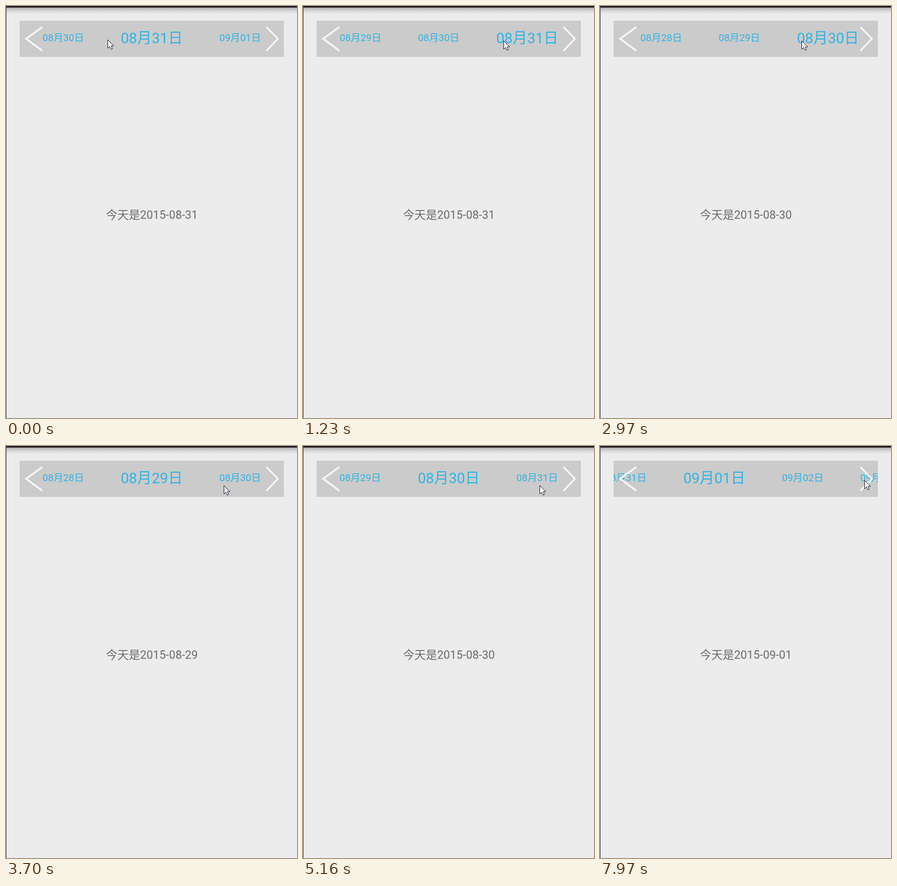
Write an HTML page with a canvas that moves like this. It is 556 by 786 pixels and loops after 8000 ms.

```html
<!DOCTYPE html>
<html lang="zh-CN">
<head>
<meta charset="utf-8">
<title>日期滑动选择</title>
<style>
html, body { margin: 0; width: 100%; height: 100%; overflow: hidden; background: #ececec; }
canvas { display: block; }
</style>
</head>
<body>
<canvas id="stage" width="556" height="786"></canvas>
<script>
const ctx = document.getElementById('stage').getContext('2d');
const LOOP = 8000;
const FAMILY = 'Roboto, "Noto Sans CJK SC", "Noto Sans CJK", sans-serif';
const BAR = { x: 26, y: 28, w: 505, h: 69 };
const CENTER = 278.4, GAP = 70.1;
const BIG = 27.9, SMALL = 18.7;
const SLOP = 35;

// Each phase eases the pointer to x, y in discrete steps; the strip follows a drag
// or sits at a fixed shift.
const start = { day: 31, x: 194, y: 64, shift: 0 };
const phases = [
  { from: 150,  to: 1110, steps: 8, day: 31, x: 379, y: 66, drag: true },
  { from: 1230, to: 1230, steps: 1, day: 31, x: 383, y: 66, shift: 150 },
  { from: 1510, to: 2080, steps: 5, day: 30, x: 193, y: 66, shift: 0 },
  { from: 2350, to: 2970, steps: 5, day: 30, x: 385, y: 66, drag: true },
  { from: 3250, to: 3700, steps: 4, day: 29, x: 416, y: 75, shift: 0 },
  { from: 4010, to: 4610, steps: 5, day: 29, x: 231, y: 75, drag: true },
  { from: 4890, to: 5160, steps: 3, day: 30, x: 452, y: 75, shift: 0 },
  { from: 5320, to: 5700, steps: 4, day: 30, x: 505, y: 65, shift: 0 },
  { from: 6120, to: 6120, steps: 1, day: 30, x: 505, y: 65, shift: -41 },
  { from: 6240, to: 6240, steps: 1, day: 31, x: 505, y: 65, shift: 0 },
  { from: 7080, to: 7080, steps: 1, day: 31, x: 505, y: 65, shift: -51 },
  { from: 7230, to: 7230, steps: 1, day: 32, x: 505, y: 65, shift: 0 },
  { from: 7970, to: 7970, steps: 1, day: 32, x: 505, y: 65, shift: -60 }
];

const easeOut = k => 1 - Math.pow(1 - k, 2.06);
const mix = (a, b, k) => a + (b - a) * k;
const pad = n => String(n).padStart(2, '0');

function stateAt(t) {
  const i = phases.findLastIndex(p => t >= p.from);
  if (i < 0) return start;
  const p = phases[i], prev = i ? phases[i - 1] : start;
  const gap = (p.to - p.from) / (p.steps - 1 || 1);
  const done = gap ? Math.floor((t - p.from) / gap + 0.001) + 1 : 1;
  const k = easeOut(Math.min(done, p.steps) / p.steps);
  const x = Math.round(mix(prev.x, p.x, k));
  const y = Math.round(mix(prev.y, p.y, k));
  const moved = x - prev.x;
  const shift = p.drag ? Math.sign(moved) * Math.max(0, Math.abs(moved) - SLOP) : p.shift;
  return { day: p.day, x, y, shift };
}

function dateParts(day) {
  const d = new Date(2015, 7, day);
  return [pad(d.getMonth() + 1), pad(d.getDate())];
}

function label(day) {
  const [m, d] = dateParts(day);
  return m + '月' + d + '日';
}

function setFont(size) {
  ctx.font = size + 'px ' + FAMILY;
}

function line(points, width, color) {
  ctx.beginPath();
  points.forEach(([x, y]) => ctx.lineTo(x, y));
  ctx.lineWidth = width;
  ctx.strokeStyle = color;
  ctx.stroke();
}

function drawBackground() {
  ctx.fillStyle = '#ececec';
  ctx.fillRect(0, 0, 556, 786);
  const shade = ctx.createLinearGradient(0, 3, 0, 15);
  shade.addColorStop(0, '#aeabae');
  shade.addColorStop(0.45, '#d4d2d4');
  shade.addColorStop(1, '#ececec');
  ctx.fillStyle = shade;
  ctx.fillRect(0, 3, 556, 12);
  ctx.fillStyle = '#241f25';
  ctx.fillRect(0, 0, 556, 3);
  ctx.fillStyle = '#444244';
  ctx.fillRect(0, 0, 1, 786);
}

function drawStrip(day, shift) {
  ctx.save();
  ctx.beginPath();
  ctx.rect(BAR.x, BAR.y, BAR.w, BAR.h);
  ctx.clip();
  ctx.fillStyle = '#cacbca';
  ctx.fillRect(BAR.x, BAR.y, BAR.w, BAR.h);

  ctx.fillStyle = '#30b3e4';
  ctx.textAlign = 'left';
  setFont(BIG);
  const bigWidth = ctx.measureText(label(day)).width;
  const left = CENTER + shift - bigWidth / 2;
  ctx.fillText(label(day), left, 70.5);

  setFont(SMALL);
  const pitch = ctx.measureText(label(day)).width + GAP;
  for (let n = 1; n <= 3; n++) {
    ctx.fillText(label(day - n), left - n * pitch, 67.4);
    ctx.fillText(label(day + n), left + bigWidth + GAP + (n - 1) * pitch, 67.4);
  }
  ctx.restore();
}

function drawArrows() {
  ctx.lineJoin = 'miter';
  const left = [[69.5, 40], [38.5, 62.5], [69.5, 85.5]];
  const right = [[497.5, 40], [519.5, 62.5], [497.5, 85.5]];
  for (const [points, width] of [[left, 3.6], [right, 3.2]]) {
    line(points, width + 1, 'rgba(255,255,255,0.2)');
    line(points, width - 0.4, 'rgba(255,255,255,0.8)');
  }
}

function drawMessage(day) {
  setFont(21.8);
  ctx.textAlign = 'center';
  ctx.fillStyle = '#6c6c6c';
  ctx.fillText('今天是2015-' + dateParts(day).join('-'), 278.7, 405.5);
}

function drawPointer(x, y) {
  ctx.save();
  ctx.translate(x + 0.5, y + 0.5);
  ctx.beginPath();
  [[0, 0], [0, 16], [3.7, 12.6], [6.2, 18], [8.8, 17], [6.5, 11.5], [11.3, 11.5]]
    .forEach(([px, py]) => ctx.lineTo(px, py));
  ctx.closePath();
  ctx.lineJoin = 'round';
  ctx.lineWidth = 1;
  ctx.fillStyle = '#fff';
  ctx.strokeStyle = '#15152a';
  ctx.fill();
  ctx.stroke();
  ctx.restore();
}

function draw(t) {
  const s = stateAt(t);
  drawBackground();
  drawStrip(s.day, s.shift);
  drawArrows();
  drawMessage(s.day);
  drawPointer(s.x, s.y);
}

const begin = performance.now();
function tick() {
  draw((performance.now() - begin) % LOOP);
  requestAnimationFrame(tick);
}
tick();
</script>
</body>
</html>
```
